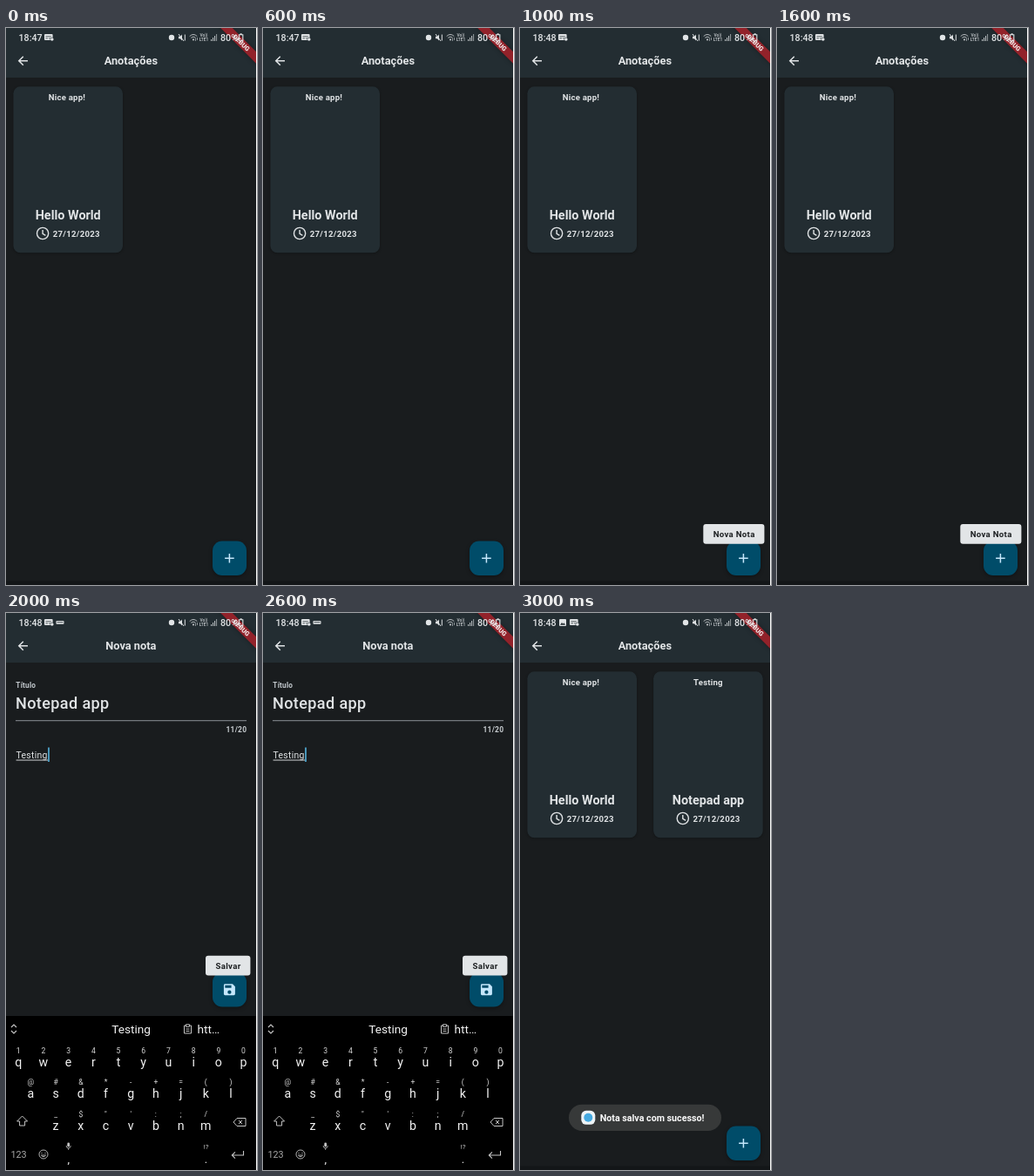
Animation of 288 by 640 pixels, one loop 4000 ms. Source, as an HTML page with a canvas:

```html
<!DOCTYPE html>
<html lang="pt">
<head>
<meta charset="utf-8">
<title>Anotações</title>
<style>
html, body { margin: 0; width: 100%; height: 100%; overflow: hidden; background: #191c1e; }
canvas { display: block; width: 288px; height: 640px; }
</style>
</head>
<body>
<canvas id="stage"></canvas>
<script>
const W = 288, H = 640, EDGE = 287, STEP = 1000;
const BG = '#191c1e', BAR = '#232d32', INK = '#e1e4e6', FAB = '#004c69', ICE = '#c5e7fb';
const canvas = document.getElementById('stage');
const ctx = canvas.getContext('2d');
const ratio = window.devicePixelRatio || 1;
canvas.width = W * ratio;
canvas.height = H * ratio;
ctx.scale(ratio, ratio);

function text(s, x, y, size, { weight = 700, color = INK, align = 'center', gap = 0 } = {}) {
  ctx.font = `${weight} ${size}px Roboto, sans-serif`;
  ctx.letterSpacing = gap + 'px';
  ctx.textAlign = align;
  ctx.textBaseline = 'alphabetic';
  ctx.fillStyle = color;
  ctx.fillText(s, x, y);
}

function rect(x, y, w, h, color) {
  ctx.fillStyle = color;
  ctx.fillRect(x, y, w, h);
}

function box(x, y, w, h, r, color, blur = 0, drop = 0) {
  ctx.save();
  if (blur) {
    ctx.shadowColor = 'rgba(0,0,0,.35)';
    ctx.shadowBlur = blur * ratio;
    ctx.shadowOffsetY = drop * ratio;
  }
  ctx.fillStyle = color;
  ctx.beginPath();
  ctx.roundRect(x, y, w, h, r);
  ctx.fill();
  ctx.restore();
}

function disc(x, y, r, color) {
  ctx.fillStyle = color;
  ctx.beginPath();
  ctx.arc(x, y, r, 0, Math.PI * 2);
  ctx.fill();
}

// Path data is relative to the point x, y.
function icon(x, y, d, { line = 1, color = INK, fill = false, scale = 1 } = {}) {
  ctx.save();
  ctx.translate(x, y);
  ctx.scale(scale, scale);
  ctx.lineWidth = line;
  ctx.fillStyle = ctx.strokeStyle = color;
  const path = new Path2D(d);
  if (fill) ctx.fill(path, 'evenodd');
  else ctx.stroke(path);
  ctx.restore();
}

function pictureIcon(x) {
  box(x - 4, 7, 8, 8, 1, INK);
  icon(x, 11, 'M-3 2.7L-1 0L.5 1.5L1.5 .3L3 2.7Z', { fill: true, color: BAR });
}

function newsIcon(x) {
  box(x - 5, 7, 9.6, 7, 1, INK);
  icon(x, 11, 'M-3.5 -1.3H2.8M-3.5 .8H-1M0 .8H1.5', { color: BAR, line: .7 });
  disc(x + 3.8, 13, 2.3, BAR);
  disc(x + 3.8, 13, 1.8, INK);
}

function keyboardIcon(x) {
  box(x - 4.5, 9, 9, 3.8, .8, INK);
  icon(x, 11, 'M-3.5 -.4H3.5', { color: BAR, line: .8 });
}

function ribbon() {
  ctx.save();
  ctx.translate(EDGE, 0);
  ctx.rotate(Math.PI / 4);
  box(-40, 19.2, 80, 9.6, 0, '#92222a', 5);
  text('DEBUG', 0, 26.6, 7.4, { weight: 900, color: '#f4e8e8' });
  ctx.restore();
}

function status(time) {
  const soft = '#b4b9bc';
  text(time, 14.5, 14.8, 10.7, { weight: 500, align: 'left' });
  disc(190, 11, 3.2, INK);
  icon(202, 11, 'M-4 -1.3H-2L0 -3.6V3.6L-2 1.3H-4Z', { fill: true });
  icon(202, 11, 'M-4 -4L2 4M3.3 -3.5V3.5');
  icon(215, 14, 'M-4.3 -4.5Q0 -8.6 4.3 -4.5M-2.7 -2.7Q0 -5.2 2.7 -2.7', { color: soft });
  disc(215, 13.4, 1.1, soft);
  icon(218.5, 13, 'M-1 -1V2M1 -2V1', { line: .7, color: soft });
  text('Vo))', 227, 10.4, 4.8, { color: soft });
  text('LTE1', 227, 15, 4.8, { color: soft });
  for (let i = 0; i < 4; i++) rect(235 + i * 2, 13 - i * 2, 1.1, 2 + i * 2, i < 3 ? soft : '#8b9296');
  text('80%', 246, 14.8, 10.7, { weight: 500, align: 'left' });
  icon(269.6, 11, 'M-2.2 -3.3H2.2V3.7H-2.2ZM-1 -4.3H1', { line: 1.1 });
}

function page(title, time) {
  rect(0, 0, W, H, BG);
  rect(0, 0, W, 57, BAR);
  icon(19.6, 37.8, 'M5.4 0H-4.6M.2 -5L-4.8 0L.2 5', { line: 1.5 });
  text(title, 143.3, 42.2, 12.8);
  ribbon();
  status(time);
}

function card(x, note, title) {
  box(x, 67.3, 125.6, 191, 8, BAR, 2.5, .8);
  const mid = x + 62.8;
  text(note, mid, 83.2, 9.6, { gap: .22 });
  text(title, mid, 220.2, 14.4);
  icon(x + 33.7, 236, 'M6.6 0A6.6 6.6 0 1 1 -6.6 0A6.6 6.6 0 1 1 6.6 0M0 -4V.4L3.3 2.4', { line: 1.4 });
  text('27/12/2023', x + 45.3, 239.5, 9.6, { align: 'left', gap: .29 });
}

function fab(y) {
  box(237, y, 39, 39.4, 11, FAB, 4, 1.5);
}

function tooltip(label, x, y) {
  const right = 280.4;
  box(x, y, right - x, 22.8, 3, '#e2e5e7');
  text(label, (x + right) / 2 + .3, y + 14.9, 9.6, { color: '#1d2022', gap: .33 });
}

function list(time) {
  page('Anotações', time);
  rect(0, 635.5, W, 4.5, '#131618');
  card(8.4, 'Nice app! ', 'Hello World');
  fab(589.5);
  icon(256.4, 609.2, 'M-5.3 0H5.3M0 -5.3V5.3', { line: 1.5, color: ICE });
}

function keyRow(keys, hints, x, y) {
  [...keys].forEach((key, i) => {
    const at = x + i * 28.7;
    text(hints[i], at, y - 10.6, 8.6, { weight: 400, color: '#d6d6d6' });
    text(key, at, y + 4.4, 14.2, { weight: 400, color: '#f2f2f2' });
  });
}

function keyboard() {
  const soft = '#c4c4c4', plain = { weight: 400, color: '#f2f2f2' };
  rect(0, 463, W, 177, '#000');
  icon(9, 478, 'M-3 -2L0 -5L3 -2M-3 2L0 5L3 2', { line: 1.2, color: soft });
  text('Testing', 143.6, 482.8, 13.7, plain);
  icon(208.5, 478, 'M-2 -4H-4V5H4V-4H2M-2 -5.2H2V-2.7H-2ZM-2 0H2M-2 2.4H2', { color: soft });
  text('htt…', 219.5, 482.8, 13.7, { ...plain, align: 'left' });

  keyRow('qwertyuiop', '1234567890', 14.2, 516.5);
  keyRow('asdfghjkl', '@#&*-+=()', 28.4, 553);
  keyRow('zxcvbnm', '_$"\':;/', 57.1, 589.8);

  icon(18.6, 584, 'M0 -6L6 0H3V5H-3V0H-6Z', { color: soft });
  icon(268, 585, 'M-7 0L-3 -4.5H7V4.5H-3ZM-1 -2L3 2M3 -2L-1 2', { color: soft });
  text('123', 14.5, 626, 10.8, { weight: 400, color: '#a9a9a9' });
  icon(43, 622, 'M5 0A5 5 0 1 1 -5 0A5 5 0 1 1 5 0M-2.6 1Q0 4.4 2.6 1ZM-2 -2V-.8M2 -2V-.8', { line: .9, color: soft });
  box(70.3, 608.5, 2.8, 5, 1.4, soft);
  icon(71.7, 612, 'M-2.6 0Q-2.4 3 0 3Q2.4 3 2.6 0M0 3V5', { line: .8, color: soft });
  text(',', 71.7, 631.5, 13, plain);
  text('!?', 229.5, 616, 8, { weight: 400, color: soft });
  text('.', 229.5, 631.5, 13, plain);
  icon(265.5, 622, 'M7 -4V1H-6M-2.6 -2.6L-6.2 1L-2.6 4.6', { line: 1.1, color: soft });
}

function editor() {
  page('Nova nota', '18:48');
  newsIcon(49);
  keyboardIcon(62);
  text('Título', 11.3, 85.8, 8.3, { align: 'left', gap: .2, color: '#c3c9ce' });
  text('Notepad app', 11, 110, 18.1, { weight: 500, align: 'left', gap: .35 });
  rect(11, 123.2, 265, 1, '#8a9196');
  text('11/20', 276.3, 137.2, 8.4, { align: 'right', gap: .3, color: '#c8cdd1' });
  text('Testing', 11.6, 167.3, 10.5, { weight: 400, align: 'left', gap: .22 });
  rect(11.6, 168.6, 36.4, .9, INK);
  rect(48.2, 154.5, 1.6, 16.5, '#55b4df');
  fab(413);
  icon(256.4, 432.8,
    'M5 -9H-7A2 2 0 0 0 -9 -7V7A2 2 0 0 0 -7 9H7A2 2 0 0 0 9 7V-5ZM3 4A3 3 0 1 1 -3 4A3 3 0 1 1 3 4M3 -3H-7V-7H3Z',
    { fill: true, color: ICE, scale: .72 });
  tooltip('Salvar', 229, 393.7);
  keyboard();
}

function toast(label) {
  box(56, 564.7, 175, 30.3, 15.1, '#373939');
  box(70.3, 571.8, 16, 16, 5.5, '#eef3f6');
  disc(78.3, 579.8, 5, '#45a9e0');
  text(label, 91.7, 583.8, 10.7, { align: 'left', color: '#fafafa' });
}

const scenes = [
  () => { list('18:47'); newsIcon(49); },
  () => { list('18:48'); newsIcon(49); tooltip('Nova Nota', 210.3, 570); },
  editor,
  () => {
    list('18:48');
    pictureIcon(49);
    newsIcon(62);
    card(153.1, 'Testing', 'Notepad app');
    toast('Nota salva com sucesso!');
  }
];

const start = performance.now();
function tick() {
  const t = performance.now() - start;
  scenes[Math.floor(t / STEP) % scenes.length]();
  rect(EDGE, 0, W - EDGE, H, '#fff');
  requestAnimationFrame(tick);
}
tick();
</script>
</body>
</html>
```
